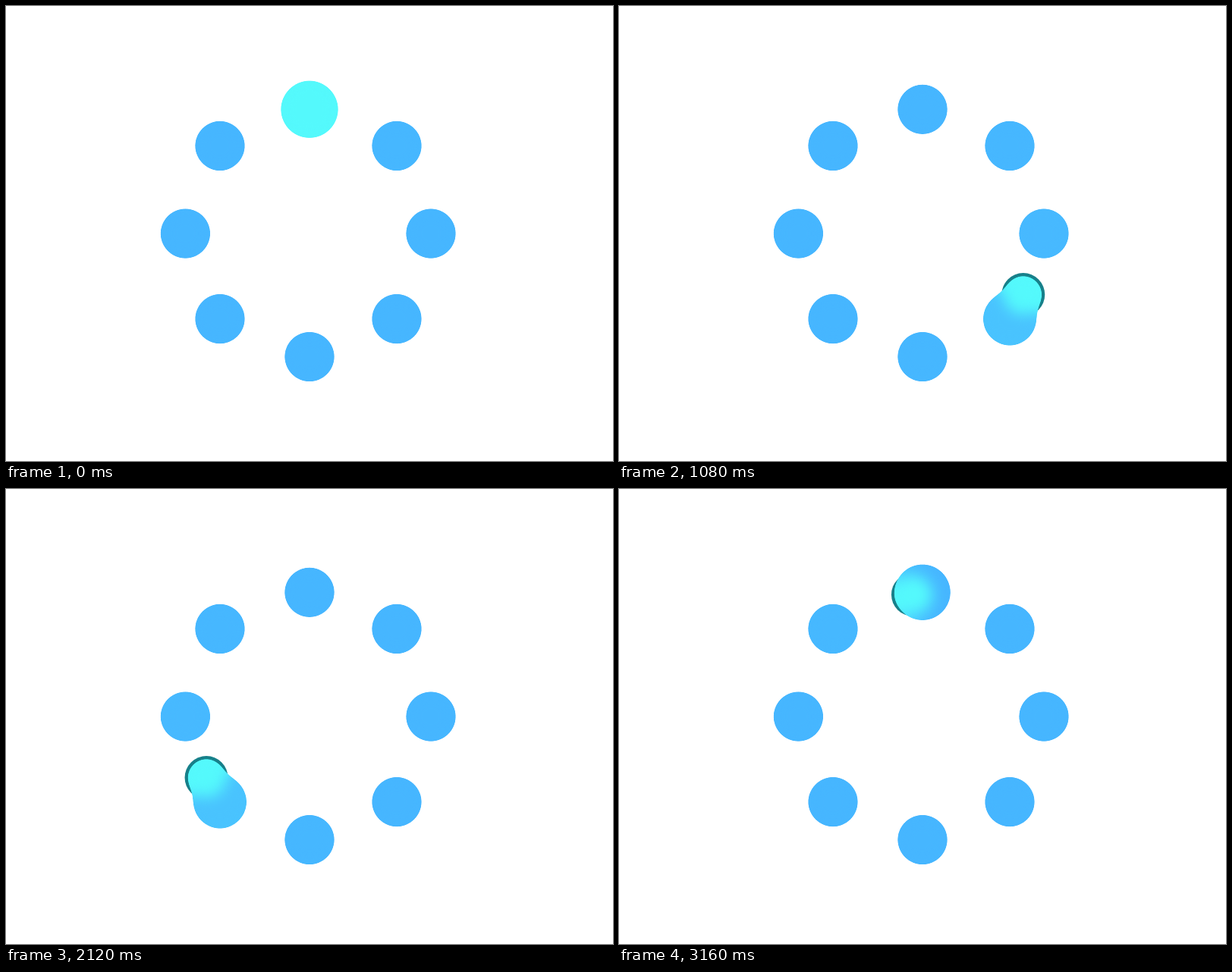
Write an HTML page that moves like this. It is 800x600 px and loops after 3.2 s.

```html
<!DOCTYPE html>
<html>
<head>
<meta charset="utf-8">
<title>Gooey loader</title>
<style>
html, body { margin: 0; width: 100%; height: 100%; overflow: hidden; background: #fff; }
svg { display: block; }
</style>
</head>
<body>
<svg width="800" height="600" viewBox="0 0 800 600">
  <filter id="goo" filterUnits="userSpaceOnUse" x="0" y="0" width="800" height="600" color-interpolation-filters="sRGB">
    <feGaussianBlur stdDeviation="9"/>
    <feColorMatrix values="1 0 0 0 0  0 1 0 0 0  0 0 1 0 0  0 0 0 30 -14.5"/>
  </filter>
  <circle id="shade" r="28.5" fill="#17808a"/>
  <g id="dots" filter="url(#goo)"></g>
</svg>
<script>
const COUNT = 8, STEP = 400, LOOP = COUNT * STEP, TICK = 40;
const BLUE = [70, 182, 255], CYAN = [84, 249, 252];
const DOT = 33.8, SWELL = 4.9, MOVER = 25.8, BOW = 5.5;
const columns = [236.4, 282, 400, 515, 560], rows = [136.3, 184.4, 300, 412.6, 462.5];
const group = document.getElementById('dots');
const shade = document.getElementById('shade');

const turn = i => i * 2 * Math.PI / COUNT;
const mix = k => `rgb(${BLUE.map((b, i) => Math.round(b + (CYAN[i] - b) * k))})`;

// clockwise from the top
const spot = i => [
  columns[2 + Math.round(2 * Math.sin(turn(i)))],
  rows[2 - Math.round(2 * Math.cos(turn(i)))]
];

function place(el, [x, y]) {
  el.setAttribute('cx', x);
  el.setAttribute('cy', y);
}

function addCircle(pos, r, fill) {
  const el = document.createElementNS('http://www.w3.org/2000/svg', 'circle');
  place(el, pos);
  el.setAttribute('r', r);
  el.setAttribute('fill', fill);
  return group.appendChild(el);
}

const dots = Array.from({ length: COUNT }, (_, i) => addCircle(spot(i), DOT, mix(0)));
const mover = addCircle([0, 0], MOVER, mix(1));

function draw(t) {
  const leg = Math.floor(t / STEP), u = t / STEP - leg;
  const [ax, ay] = spot(leg), [bx, by] = spot(leg + 1);

  // chord between two dots, bowed slightly outward
  const bow = BOW * 4 * u * (1 - u), angle = turn(leg + 0.5);
  const pos = [
    ax + (bx - ax) * u + bow * Math.sin(angle),
    ay + (by - ay) * u - bow * Math.cos(angle)
  ];
  place(mover, pos);
  place(shade, pos);

  dots.forEach((dot, i) => {
    const gap = Math.abs(t - i * STEP);
    const near = Math.min(gap, LOOP - gap);
    dot.setAttribute('r', DOT + SWELL * Math.max(0, 1 - near / 220));
    // the glow does not wrap round the loop, so the first dot lights up at once
    dot.setAttribute('fill', mix(1 / (1 + (gap / 60) ** 2)));
  });
}

const start = performance.now();
function frame() {
  const t = (performance.now() - start) % LOOP;
  draw(Math.floor(t / TICK) * TICK);
  requestAnimationFrame(frame);
}
frame();
</script>
</body>
</html>
```
